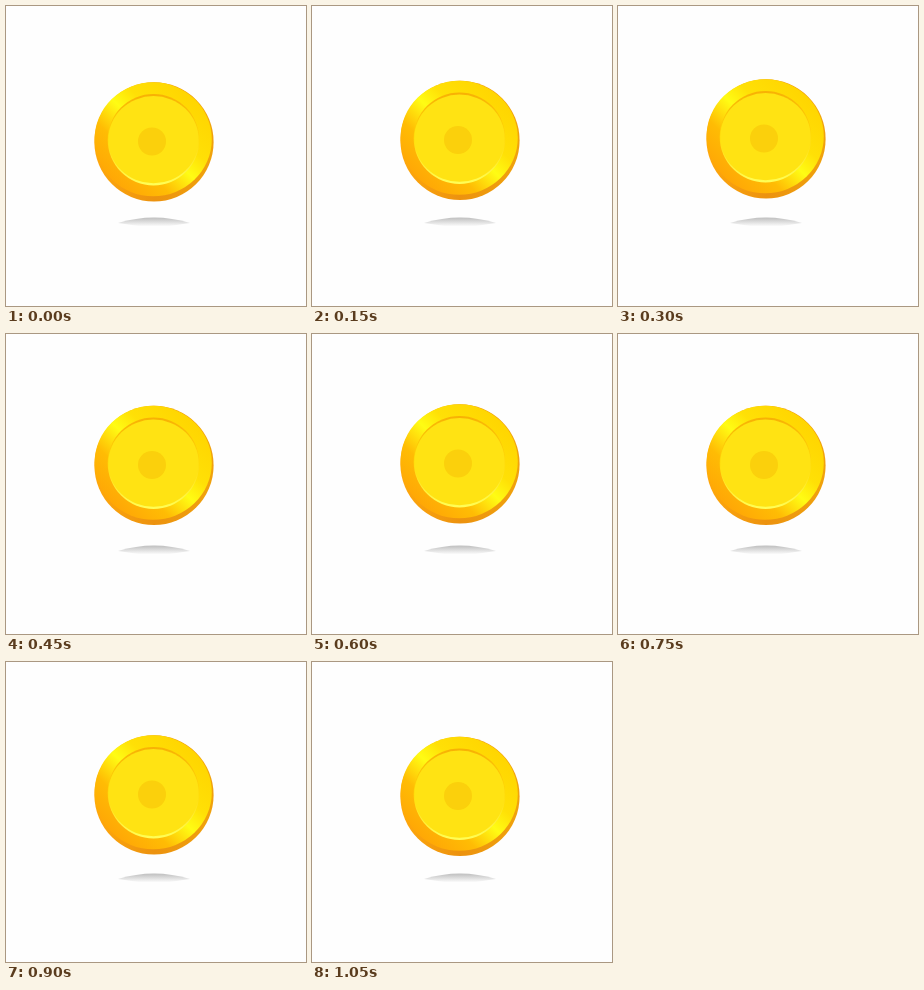
Write an HTML page that moves like this. It is 300x300 px and loops after 1.2 s.

```html
<!DOCTYPE html>
<html lang="en">
<head>
<meta charset="utf-8">
<title>Floating coin</title>
<style>
  html, body { margin: 0; width: 100%; height: 100%; overflow: hidden; background: #fefefe; }
  svg { display: block; width: 100%; height: 100%; }
</style>
</head>
<body>
<svg viewBox="0 0 300 300">
  <defs>
    <linearGradient id="side">
      <stop offset="0" stop-color="#ffa80c"/>
      <stop offset=".5" stop-color="#ec920f"/>
      <stop offset="1" stop-color="#f0a20c"/>
    </linearGradient>
    <linearGradient id="rim" x1=".12" y1=".88" x2=".88" y2=".12">
      <stop offset="0" stop-color="#ffa406"/>
      <stop offset=".28" stop-color="#ffbc04"/>
      <stop offset=".5" stop-color="#fffc14"/>
      <stop offset=".66" stop-color="#ffe006"/>
      <stop offset="1" stop-color="#ffd400"/>
    </linearGradient>
    <linearGradient id="bevel" x1="0" y1="0" x2="0" y2="1">
      <stop offset="0" stop-color="#f8b004"/>
      <stop offset=".5" stop-color="#ffd808"/>
      <stop offset="1" stop-color="#ffff58"/>
    </linearGradient>
    <linearGradient id="shade" x1="0" y1="0" x2="0" y2="1">
      <stop offset="0" stop-color="#bebebe"/>
      <stop offset=".5" stop-color="#dedede"/>
      <stop offset="1" stop-color="#fefefe"/>
    </linearGradient>
  </defs>
  <path d="M112 217 Q148 206 184 217 Q148 224 112 217Z" fill="url(#shade)"/>
  <g id="coin">
    <circle cx="148" cy="135.9" r="59.6" fill="url(#side)"/>
    <ellipse cx="147.2" cy="133.3" rx="58.6" ry="57" fill="url(#rim)"/>
    <circle cx="147.5" cy="133.7" r="45.8" fill="url(#bevel)"/>
    <ellipse cx="147.5" cy="133.7" rx="45.2" ry="43.6" fill="#ffe313"/>
    <circle cx="146" cy="135.5" r="14" fill="#fbd00c"/>
  </g>
</svg>
<script>
  const STEP = 150, STEPS = 8, RISE = 1.5;
  const coin = document.getElementById("coin");

  // The coin rises for half the loop and sinks for the other half, in held steps.
  function draw(now) {
    const step = Math.floor(now / STEP) % STEPS;
    const lift = RISE * Math.min(step, STEPS - step);
    coin.setAttribute("transform", `translate(0 ${-lift})`);
  }

  const start = performance.now();
  function tick() {
    draw(performance.now() - start);
    requestAnimationFrame(tick);
  }
  tick();
</script>
</body>
</html>
```
